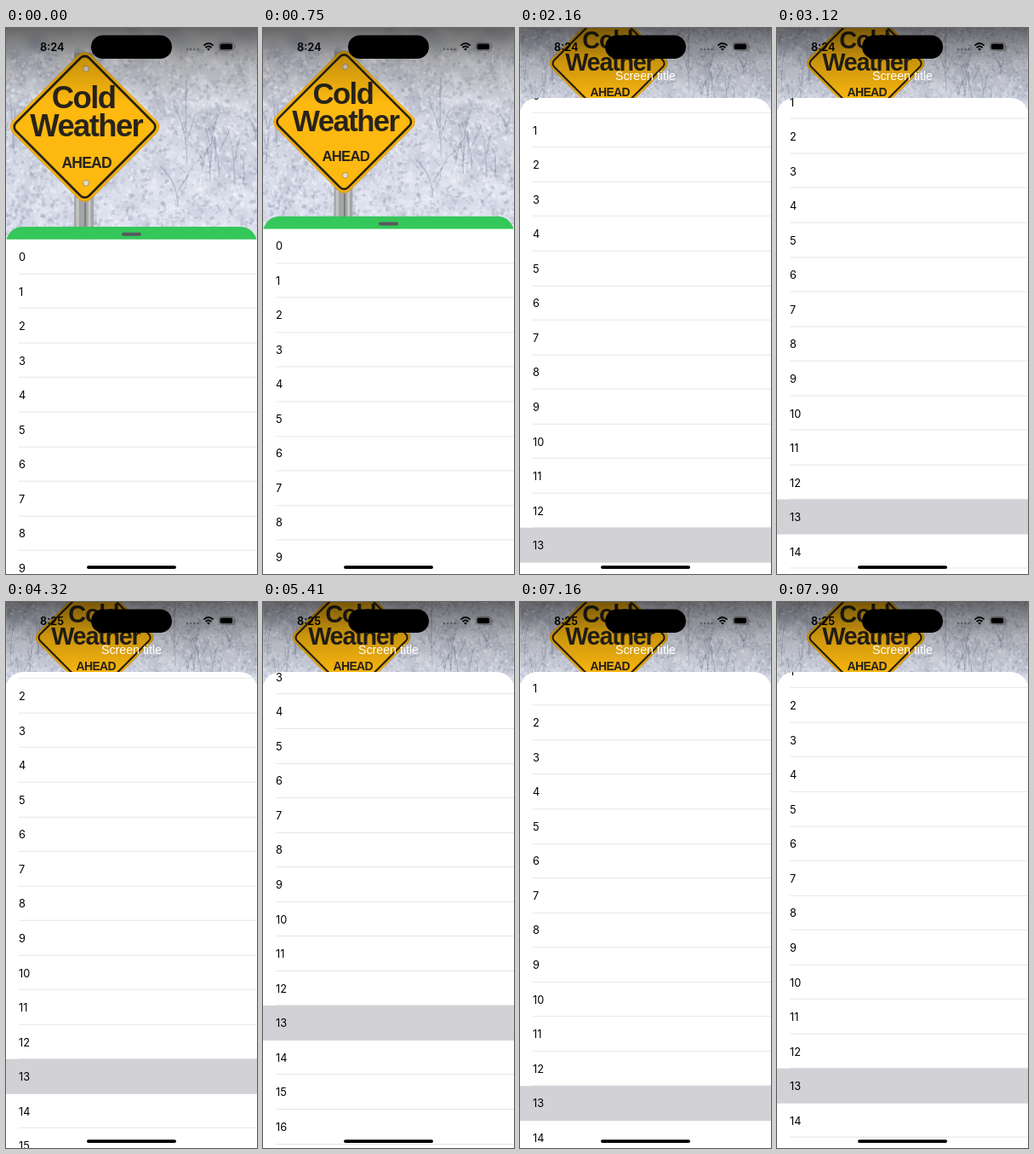
Write an HTML page with a canvas that moves like this. It is 295 by 640 pixels and loops after 8000 ms.

```html
<!DOCTYPE html>
<html lang="en">
<head>
<meta charset="utf-8">
<title>Collapsing header list</title>
<style>
  html, body { margin: 0; width: 100%; height: 100%; overflow: hidden; background: #fff; }
  #stage { position: relative; width: 295px; height: 640px; overflow: hidden; background: #fff;
    font: 12.75px Inter, sans-serif; color: #000; }
  #stage > *, #photo > * { position: absolute; }
  #header { left: 0; top: 0; width: 295px; overflow: hidden; }
  #photo { position: absolute; left: -39px; top: 0; width: 373px; height: 248px; }
  #photo > * { left: 0; top: 0; width: 373px; height: 248px; }
  #shade { left: 0; top: 0; width: 295px; height: 88px;
    background: linear-gradient(rgba(0,0,0,.53), rgba(0,0,0,.2) 45%, rgba(0,0,0,0)); }
  #title { left: 0; top: 46px; width: 295px; line-height: 20px; text-align: center; color: #fff;
    font-family: "Liberation Sans", Arial, sans-serif; font-size: 14.2px; }
  #sheet { left: 0; top: 82px; width: 295px; height: 558px; overflow: hidden; border-radius: 20px 20px 0 0; }
  #list { position: absolute; left: 0; top: -82px; width: 295px; height: 900px; background: #fff; }
  #grip { position: absolute; top: -15px; width: 295px; height: 15px; overflow: hidden; }
  #grip::before { content: ""; position: absolute; width: 295px; height: 40px; background: #34c759; border-radius: 22px; }
  #grip::after { content: ""; position: absolute; left: 136px; top: 7.4px; width: 23px; height: 3.4px;
    border-radius: 2px; background: #5a585f; }
  .row { position: absolute; left: 0; width: 280px; height: 40.55px; line-height: 42.6px; padding-left: 15px; }
  .row::after { content: ""; position: absolute; left: 15px; right: 0; bottom: 0; height: .8px; background: #e6e6e8; }
  .picked { background: #d1d1d6; }
  .picked::after { display: none; }
  #clock { left: 40px; top: 12.5px; line-height: 20px; font-size: 12.75px; font-weight: 600; }
</style>
</head>
<body>
<div id="stage">
  <div id="header">
    <div id="photo">
      <canvas id="snow" width="746" height="496"></canvas>
      <svg viewBox="-39 0 373 248">
        <rect x="80" y="29" width="23" height="219" fill="#a4a5a6"/>
        <path d="M84 200V248M98 200V248" stroke="#c5c6c7" stroke-width="3"/>
        <path d="M93 204V248" stroke="#65666a" stroke-width="1.2"/>
        <g transform="translate(92.5 116) rotate(45)">
          <rect x="-65" y="-65" width="130" height="130" rx="10" fill="#e2a00c"/>
          <rect x="-64.3" y="-64.3" width="128" height="128" rx="9.5" fill="#fdb90f"/>
          <rect x="-60.7" y="-60.7" width="121.4" height="121.4" rx="7" fill="none" stroke="#2b2212" stroke-width="2.8"/>
        </g>
        <g fill="#dedcd0" stroke="#a98636" stroke-width=".8">
          <circle cx="94" cy="48" r="3.5"/><circle cx="94" cy="182" r="3.5"/>
        </g>
        <g font-family="Liberation Sans, Arial, sans-serif" font-weight="700" text-anchor="middle" fill="#28231b">
          <text x="91" y="94" font-size="36.5" letter-spacing="-1.6">Cold</text>
          <text x="94.2" y="127" font-size="36.5" letter-spacing="-1.6">Weather</text>
          <text x="94.6" y="164.6" font-size="17.6" letter-spacing="-.8">AHEAD</text>
        </g>
      </svg>
    </div>
  </div>
  <div id="shade"></div>
  <div id="title">Screen title</div>
  <div id="sheet"><div id="list"><div id="grip"></div></div></div>
  <div id="clock">8:24</div>
  <svg width="295" height="640" viewBox="0 0 295 640">
    <rect x="100" y="8.5" width="95" height="27.5" rx="13.75"/>
    <g fill="#000" fill-opacity=".35">
      <circle cx="213" cy="25" r="1.2"/><circle cx="217.2" cy="25" r="1.2"/>
      <circle cx="221.4" cy="25" r="1.2"/><circle cx="225.6" cy="25" r="1.2"/>
    </g>
    <g fill="none" stroke="#000" stroke-width="1.9">
      <path d="M232.4 20.6Q238 15.6 243.6 20.6M234.5 23Q238 19.9 241.5 23"/>
    </g>
    <path d="M236.1 24.6Q238 23 239.9 24.6L238 26.7Z"/>
    <rect x="250.4" y="17.4" width="17.8" height="9" rx="2.9" fill="none" stroke="#000" stroke-opacity=".4" stroke-width=".8"/>
    <rect x="251.6" y="18.6" width="14.6" height="6.6" rx="1.8"/>
    <path d="M269.3 20.4q1.3 1.5 0 3z" fill-opacity=".45"/>
    <rect x="95" y="630.2" width="105" height="3.8" rx="1.9"/>
  </svg>
</div>
<script>
const $ = id => document.getElementById(id);
const LOOP = 8000, PITCH = 40.55, PICK = 13;
const clamp = (v, lo, hi) => Math.min(hi, Math.max(lo, v));
const out = p => 1 - (1 - p) ** 2;
const smooth = p => p * p * (3 - 2 * p);
const linear = p => p;

// Each move: first step (ms), last step (ms), steps, centre of row 0 at the end, easing
const START = 268;
const MOVES = [
  [500, 500, 1, 264, linear],
  [640, 1200, 6, 151.5, smooth],
  [1590, 2160, 6, 79, smooth],
  [2310, 2550, 3, 73, out],
  [2900, 3340, 5, 31, smooth],
  [3690, 3690, 1, 30, linear],
  [4320, 4320, 1, 29, linear],
  [4460, 5180, 7, -32, smooth],
  [5300, 5410, 2, -33.7, out],
  [6600, 7160, 6, 60.5, smooth],
  [7270, 7380, 2, 55, linear],
  [7490, 7490, 1, 51, linear],
  [7650, 7760, 2, 43, linear],
  [7900, 7900, 1, 40, linear]
];

function rowCentre(t) {
  let y = START;
  for (const [first, last, steps, end, ease] of MOVES) {
    if (t < first) break;
    const gap = steps > 1 ? (last - first) / (steps - 1) : 1;
    const done = Math.min(steps, Math.floor((t - first) / gap + 1e-6) + 1);
    y += (end - y) * ease(done / steps);
  }
  return y;
}

function paintSnow() {
  const g = $("snow").getContext("2d");
  let seed = 11;
  const rnd = () => (seed = seed * 16807 % 2147483647) / 2147483647;
  g.scale(2, 2);
  const sky = g.createLinearGradient(0, 0, 0, 248);
  sky.addColorStop(0, "#d9d9d9");
  sky.addColorStop(.3, "#cfd1da");
  sky.addColorStop(.55, "#d0d4e1");
  sky.addColorStop(1, "#dde1ef");
  g.fillStyle = sky;
  g.fillRect(0, 0, 373, 248);
  // Hazy clumps
  for (let i = 0; i < 260; i++) {
    const x = rnd() * 373, y = rnd() * 248, r = 5 + rnd() * 17;
    const haze = g.createRadialGradient(x, y, 0, x, y, r);
    const tone = rnd() < .52 ? "242,244,251" : "164,170,190";
    haze.addColorStop(0, `rgba(${tone},.34)`);
    haze.addColorStop(1, `rgba(${tone},0)`);
    g.fillStyle = haze;
    g.fillRect(x - r, y - r, 2 * r, 2 * r);
  }
  // Frost specks
  for (let i = 0; i < 4200; i++) {
    const r = .6 + rnd() * 1.7;
    g.fillStyle = rnd() < .56 ? "rgba(246,248,254,.32)" : "rgba(128,135,160,.2)";
    g.beginPath();
    g.ellipse(rnd() * 373, 25 + rnd() * 223, r * 1.5, r, rnd() * 3, 0, 7);
    g.fill();
  }
  // Bare branches
  for (let i = 0; i < 22; i++) {
    const x = i % 3 ? 225 + rnd() * 140 : rnd() * 50, y = 130 + rnd() * 90;
    const h = 25 + rnd() * 50, lean = (rnd() - .5) * 50;
    g.strokeStyle = "rgba(110,116,140,.28)";
    g.lineWidth = .6 + rnd() * 1.2;
    g.beginPath();
    g.moveTo(x, y);
    g.quadraticCurveTo(x, y - h * .6, x + lean, y - h);
    g.moveTo(x, y - h * .4);
    g.lineTo(x - lean * .6, y - h * .8);
    g.stroke();
  }
}

const rows = Array.from({ length: 20 }, (_, i) => {
  const row = document.createElement("div");
  row.className = "row";
  row.style.top = i * PITCH + "px";
  row.textContent = i;
  return $("list").appendChild(row);
});

function draw(now) {
  const t = now % LOOP;
  const top = rowCentre(t) - PITCH / 2;
  const height = Math.max(96, top);
  const scale = Math.max(.79, height / 248);
  $("header").style.height = height + "px";
  $("photo").style.transform = `translateY(${height / 2 - 124}px) scale(${scale})`;
  $("title").style.opacity = clamp((200 - height) / 80, 0, 1);
  $("list").style.transform = `translateY(${top}px)`;
  $("clock").textContent = t < 3690 ? "8:24" : "8:25";
  rows[PICK].classList.toggle("picked", t >= 2150);
  requestAnimationFrame(draw);
}

paintSnow();
draw(0);
</script>
</body>
</html>
```
